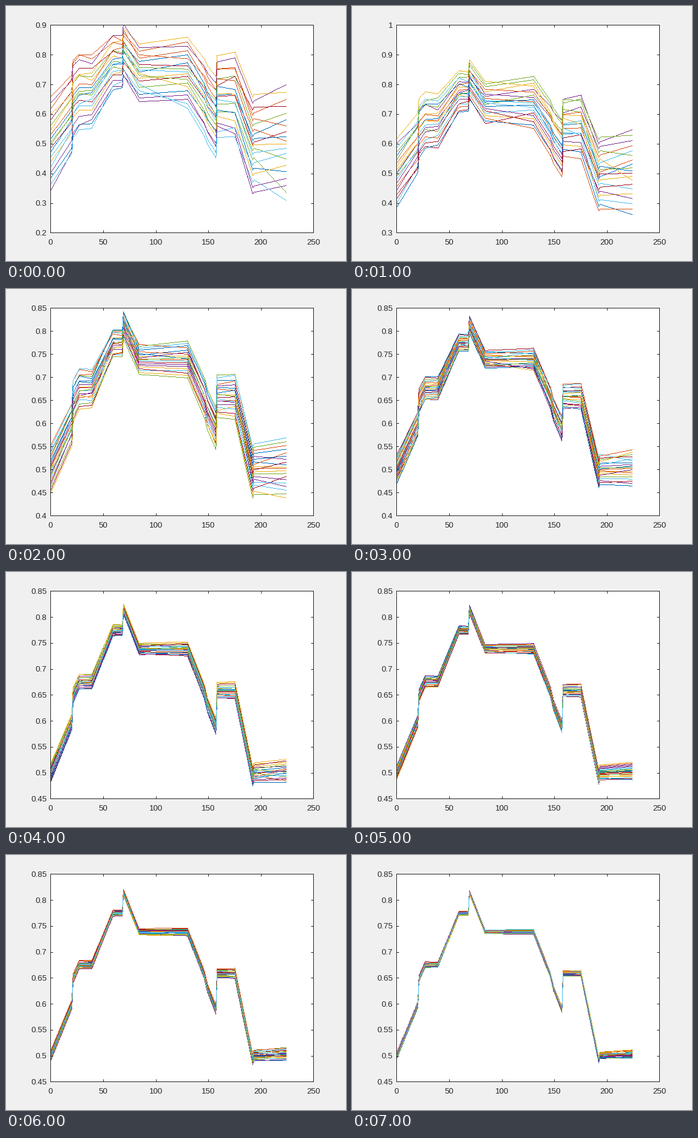
Write a matplotlib script that moves like this. It is 560 by 420 pixels and loops after 8 s.

```python
import numpy as np
import matplotlib.pyplot as plt
from matplotlib.animation import FuncAnimation

W, H, DPI = 560, 420, 100
PX = 72 / DPI  # one pixel in points
AX_W, AX_H = 433, 342
INK = "#262626"
COLORS = ["#0072BD", "#D95319", "#EDB120", "#7E2F8E",
          "#77AC30", "#4DBEEE", "#A2142F"]
COUNT = 20

# The curve that every line settles on
X = np.array([0, 20, 21, 27, 39, 59, 68, 69, 84, 130,
              146, 149, 157, 158, 175, 192, 193, 224])
BASE = np.array([.500, .598, .648, .675, .675, .774, .774, .814, .738, .738,
                 .655, .629, .588, .658, .658, .492, .500, .503])

# Relative width of the bundle along x, and its overall width at each step
STATIONS = [0, 40, 64, 84, 130, 166, 193, 224]
PROFILE = [1.05, .83, .6, .65, .8, .95, 1.1, 1.3]
SPREAD = [.15, .11, .05, .03, .017, .013, .0095, .006]
LIMITS = [(.2, .9), (.3, 1)] + [(.4, .85)] * 2 + [(.45, .85)] * 4


def bundle(spread, rng):
    """All lines of one step; their ranks drift slowly along x."""
    pos = rng.random(COUNT)
    offsets = []
    for width in PROFILE:
        rank = pos.argsort().argsort() / (COUNT - 1)
        q = 2 * rank - 1
        offsets.append(spread * width * np.sign(q) * abs(q) ** 1.25)
        pos = rank + rng.normal(0, .13, COUNT)
    return [BASE + np.interp(X, STATIONS, row) for row in np.transpose(offsets)]


def trace(y, limits):
    """Sample a polyline once per pixel, for crisp unsmoothed strokes."""
    px = X * AX_W / 250
    py = y * AX_H / (limits[1] - limits[0])
    length = np.maximum(abs(np.diff(px)), abs(np.diff(py)))
    knots = np.append(0, np.cumsum(np.ceil(length)))
    t = np.arange(knots[-1] + 1)
    return np.interp(t, knots, X), np.interp(t, knots, y)


rng = np.random.default_rng(12)
STEPS = [[trace(y, limits) for y in bundle(spread, rng)]
         for spread, limits in zip(SPREAD, LIMITS)]

plt.rcParams["font.family"] = "Liberation Sans"
fig = plt.figure(figsize=(W / DPI, H / DPI), dpi=DPI, facecolor="#F0F0F0")
ax = fig.add_axes([73.4 / W, 46.6 / H, AX_W / W, AX_H / H])
ax.set_xlim(0, 250)
ax.set_xticks(range(0, 251, 50))
ax.set_axisbelow(False)
ax.tick_params(direction="in", top=True, right=True, length=4.3 * PX,
               width=PX, color=INK, labelcolor=INK, labelsize=13.33 * PX)
ax.tick_params(axis="x", pad=11 * PX)
ax.tick_params(axis="y", pad=6 * PX)
for spine in ax.spines.values():
    spine.set(linewidth=PX, color=INK)

lines = [ax.plot([], [], ",", color=COLORS[i % len(COLORS)])[0]
         for i in range(COUNT)]


def update(n):
    low, high = LIMITS[n]
    gap = .1 if high - low > .5 else .05
    ticks = low + gap * np.arange(round((high - low) / gap) + 1)
    ax.set_yticks(ticks, [f"{t:.3g}" for t in ticks])
    ax.set_ylim(low, high)
    for line, points in zip(lines, STEPS[n]):
        line.set_data(*points)
    return lines


anim = FuncAnimation(fig, update, frames=len(STEPS), interval=1000,
                     repeat=True, repeat_delay=0, blit=False)
plt.show()
```
